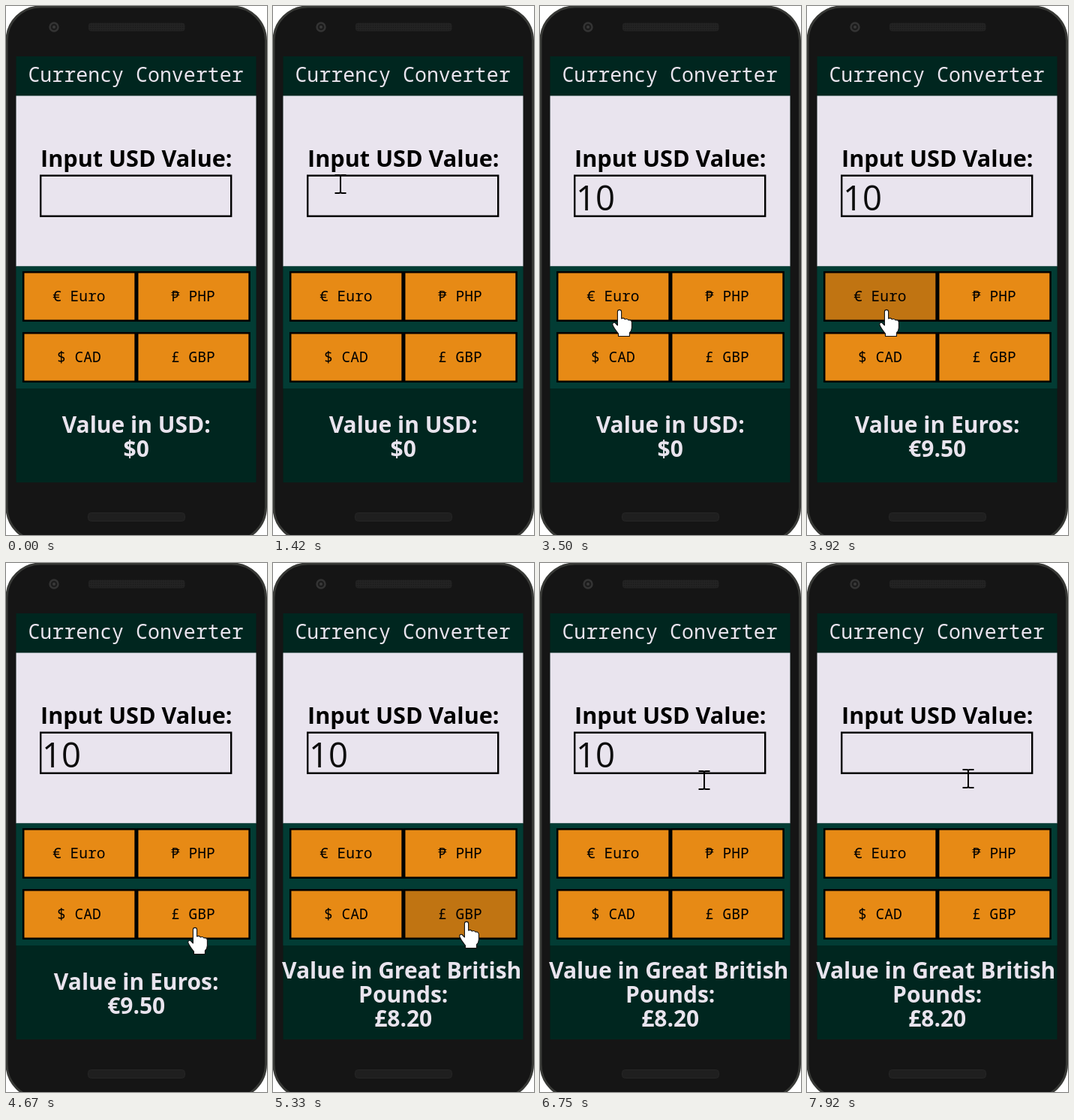
Recreate the animation shown at these times as an HTML page. Size 348 px wide and 704 px high, loop 8000 ms.

```html
<!DOCTYPE html>
<html lang="en">
<head>
<meta charset="utf-8">
<title>Currency Converter</title>
<style>
  html, body { margin: 0; width: 100%; height: 100%; overflow: hidden; background: #fff; }
  svg { display: block; width: 100%; height: 100%; }
  text { text-anchor: middle; }
  .mono { font-family: "Noto Sans Mono", "DejaVu Sans Mono", monospace; }
  .title { font-size: 26.6px; fill: #e9e4ee; }
  .label { font: 700 30.6px "Open Sans", "Noto Sans", sans-serif; }
  .result { font: 700 30px "Open Sans", "Noto Sans", sans-serif; fill: #e9e4ee; }
  .amount { font: 400 45.4px "Open Sans", "Noto Sans", sans-serif; text-anchor: start; fill: #0c0c0c; }
  .button text { font-size: 19.6px; }
  .button rect { stroke: #000; stroke-width: 2.5; }
</style>
</head>
<body>
<svg viewBox="0 0 348 704">
  <defs>
    <pattern id="mesh" width="3" height="3" patternUnits="userSpaceOnUse">
      <rect width="3" height="3" fill="#232323"/>
      <circle cx="1.5" cy="1.5" r=".8" fill="#1a1a1a"/>
    </pattern>
  </defs>

  <rect x="1" y="1" width="345.5" height="711" rx="45" fill="#151515" stroke="#383936" stroke-width="3"/>
  <circle cx="64" cy="28" r="5.5" fill="#1c1c1c" stroke="#343434" stroke-width="2.4"/>
  <circle cx="64" cy="28" r="2" fill="#3a3a3a"/>
  <rect x="110" y="22.5" width="128.5" height="11" rx="4" fill="url(#mesh)"/>
  <rect x="109.5" y="674.5" width="129" height="11" rx="4" fill="#1f1f1f" stroke="#262626"/>

  <rect x="13.5" y="67" width="320" height="567" fill="#00261f"/>
  <rect x="13.5" y="119.5" width="320" height="227" fill="#e9e4ee"/>
  <rect x="13.5" y="346.5" width="320" height="162.5" fill="#023c34"/>
  <text class="mono title" x="173" y="101">Currency Converter</text>
  <text class="label" x="173.8" y="214">Input USD Value:</text>
  <rect x="46.2" y="225.7" width="254" height="54" fill="none" stroke="#000" stroke-width="2.4"/>
  <text class="amount" id="amount" x="48" y="272"></text>

  <g id="buttons"></g>
  <g id="result"></g>

  <path id="beam" fill="none" stroke="#000" stroke-width="2"
    d="M-7.5-12H-2Q0-12 0-10Q0-12 2-12H7.5M0-11V11M-7.5 12H-2Q0 12 0 10Q0 12 2 12H7.5"/>
  <path id="hand" fill="#fff" stroke="#111" stroke-width="1.1" stroke-linejoin="round"
    d="M-2.6 3a2.6 2.6 0 0 1 5.2 0V12q3.2-1.5 4.6 1q3.2-1.3 4.6 1q4-.8 4.6 3V24q0 4-3 7V35.5H-1.5V32q-5.5-6.5-7.6-11.5q-.6-4 3.2-3L-2.6 21Z"/>
</svg>
<script>
const LOOP = 8000, STEP = 1000 / 12;
const $ = id => document.getElementById(id);
const SVG = "http://www.w3.org/2000/svg";

function add(parent, tag, attrs, text = "") {
  const node = document.createElementNS(SVG, tag);
  for (const key in attrs) node.setAttribute(key, attrs[key]);
  node.textContent = text;
  parent.append(node);
  return node;
}

function addButton(label, x, y) {
  const group = add($("buttons"), "g", { class: "button" });
  const face = add(group, "rect", { x: x + 1.2, y: y + 1.2, width: 149.4, height: 64.6 });
  add(group, "text", { class: "mono", x: x + 75.3, y: y + 40.2 }, label);
  return face;
}

const euro = addButton("€ Euro", 22, 353);
const peso = addButton("₱ PHP", 174, 353);
const canadian = addButton("$ CAD", 22, 434);
const pound = addButton("£ GBP", 174, 434);

// Each state holds from its time until the next one.
const amounts = [[0, ""], [2000, "1"], [2170, "10"], [7330, "1"], [7500, ""]];
const results = [
  [0, ["Value in USD:", "$0"]],
  [3830, ["Value in Euros:", "€9.50"]],
  [5080, ["Value in Great British", "Pounds:", "£8.20"]]
];
// time, x, y
const path = [
  [1170, -12, 285], [1420, 90, 237], [2330, 90, 237], [2700, 96, 262],
  [3500, 106, 404], [4000, 106, 404], [4670, 252, 485], [5000, 258, 477],
  [5850, 258, 477], [6580, 219, 289], [6750, 219, 289], [7250, 215, 287], [8000, 215, 287]
];

const clamp = v => Math.min(1, Math.max(0, v));
const ease = v => v * v * (3 - 2 * v);
const ramp = (t, from, to) => clamp((t - from) / (to - from));
const stateAt = (table, t) => table.filter(([start]) => start <= t).pop()[1];

function pointAt(t) {
  const next = path.findIndex(([time]) => time > t);
  if (next < 1) return null;
  const [t0, x0, y0] = path[next - 1], [t1, x1, y1] = path[next];
  const k = ease(ramp(t, t0, t1));
  return [x0 + (x1 - x0) * k, y0 + (y1 - y0) * k];
}

function shade(face, level) {
  const mix = (a, b) => Math.round(a + (b - a) * level);
  face.setAttribute("fill", `rgb(${mix(231, 192)},${mix(138, 116)},${mix(21, 18)})`);
}

let shown;
function showResult(lines) {
  if (lines === shown) return;
  shown = lines;
  $("result").replaceChildren();
  const top = lines.length === 3 ? 552.5 : 568;
  lines.forEach((line, i) =>
    add($("result"), "text", { class: "result", x: line.length > 20 ? 171.7 : 173.7, y: top + i * 32 }, line));
}

function draw(now) {
  // +4 keeps steps aligned with times rounded to 10 ms.
  const t = Math.floor((now % LOOP + 4) / STEP) * STEP + 4;
  $("amount").textContent = stateAt(amounts, t);
  showResult(stateAt(results, t));
  shade(euro, ramp(t, 3510, 3800) - ramp(t, 4080, 4380));
  shade(pound, ramp(t, 4680, 4980) - ramp(t, 5920, 6220));

  const point = pointAt(t);
  const overButtons = point && point[1] > 320;
  $("hand").style.display = overButtons ? "" : "none";
  $("beam").style.display = point && !overButtons ? "" : "none";
  if (point) $(overButtons ? "hand" : "beam").setAttribute("transform", `translate(${point})`);
}

shade(peso, 0);
shade(canadian, 0);
const start = performance.now();
function tick() {
  draw(performance.now() - start);
  requestAnimationFrame(tick);
}
tick();
</script>
</body>
</html>
```
